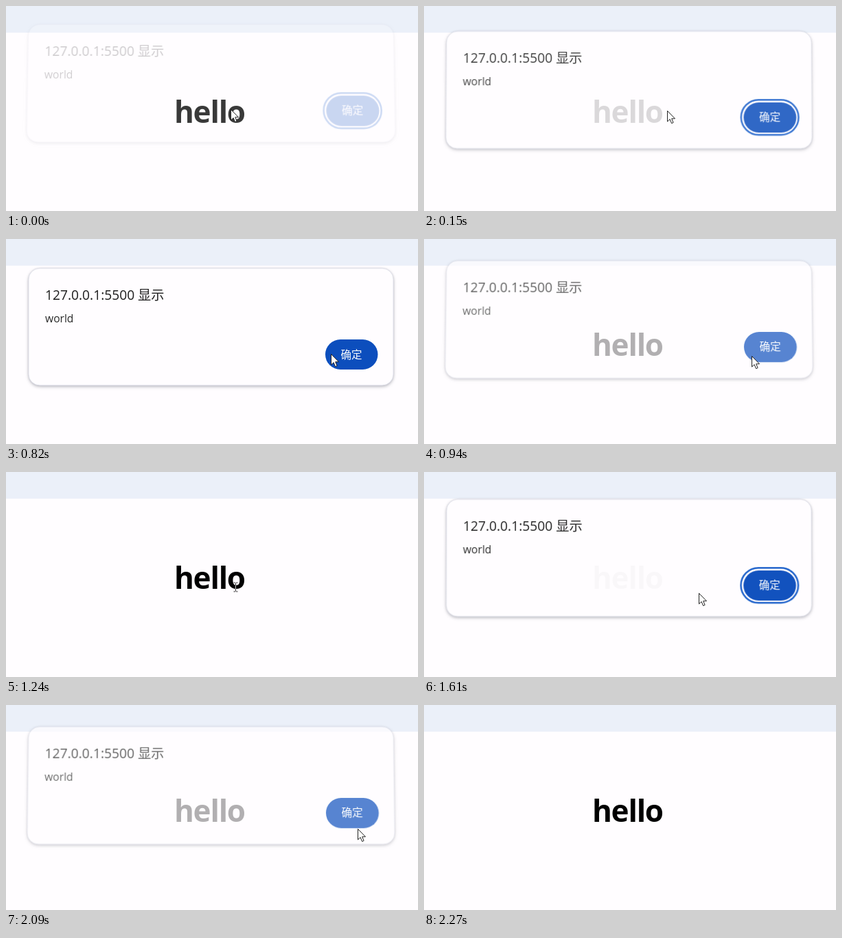
An HTML page for the animation above (2480 ms loop, 600 by 300 pixels).

```html
<!DOCTYPE html>
<html lang="zh-CN">
<head>
<meta charset="utf-8">
<title>Alert loop</title>
<style>
  html, body { margin: 0; width: 100%; height: 100%; overflow: hidden; background: #fffdff; }
  #stage { position: relative; width: 600px; height: 300px; overflow: hidden; background: #fffdff; isolation: isolate; }
  svg { position: absolute; left: 0; top: 0; overflow: visible; }
  text { font-family: "Open Sans", "Noto Sans", "Noto Sans CJK SC", "Noto Sans CJK", sans-serif; }
  #dialog { left: 33px; top: 43px; transform-origin: 50% 0; }
  #panel { filter: drop-shadow(0 0 1px rgba(60, 64, 80, .15)) drop-shadow(0 2px 2px rgba(60, 64, 80, .3)); }
  #beam { mix-blend-mode: difference; }
</style>
</head>
<body>
<div id="stage">
  <svg width="600" height="300">
    <rect width="600" height="39" fill="#ebf0f9"/>
    <text x="244.9" y="171" font-size="44" font-weight="700" letter-spacing="-1.2">hello</text>
  </svg>
  <svg id="dialog" width="531" height="171">
    <rect id="panel" width="531" height="171" rx="16" fill="#fffdff" stroke="#e2e3ec"/>
    <text x="24" y="46" font-size="19.2" fill="#1f1f1f">127.0.0.1:5500 显示</text>
    <text x="24" y="79" font-size="15.6" fill="#2b2b2b">world</text>
    <rect id="ring" x="428.3" y="100.3" width="83.4" height="50.9" rx="25.4" fill="none" stroke="#1a5fca" stroke-width="2.5"/>
    <rect x="432" y="104" width="76.5" height="44" rx="22" fill="#0c4ebd"/>
    <text x="470" y="131.5" font-size="15.5" fill="#fff" text-anchor="middle">确定</text>
  </svg>
  <svg id="arrow" width="14" height="20">
    <path d="M0 0V15.6L3.6 12.2L6.1 18.2L8.6 17.1L6.2 11.3H11Z" fill="#fff" stroke="#222" stroke-linejoin="round"/>
  </svg>
  <svg id="beam" width="8" height="16">
    <path d="M-3 -6.5H-.5M.5 -6.5H3M0 -6V6M-3 6.5H-.5M.5 6.5H3" fill="none" stroke="#ccc"/>
  </svg>
</div>
<script>
const LOOP = 2480, OPEN_LEAD = 35, PRESS_LEAD = 80, CLOSE_TIME = 200;
const alerts = [{ open: 0, close: 880 }, { open: 1390, close: 2030 }];

// Places where the pointer turns or rests
const stops = [
  { t: 0, x: 327, y: 151 },
  { t: 520, x: 459, y: 160 },
  { t: 960, x: 477, y: 171 },
  { t: 1190, x: 264, y: 160 },
  { t: 1240, x: 334, y: 168 },
  { t: 1390, x: 334, y: 168 },
  { t: 1610, x: 400, y: 177 },
  { t: 2090, x: 512, y: 181 },
  { t: 2265, x: 532, y: 305 }
];

const $ = id => document.getElementById(id);
const dialog = $("dialog"), ring = $("ring"), arrow = $("arrow"), beam = $("beam");
const clamp = v => Math.max(0, Math.min(1, v));
const smooth = p => p * p * (3 - 2 * p);
const mix = (a, b, p) => a + (b - a) * p;

function pointer(t) {
  const next = stops.findIndex(s => s.t > t);
  if (next < 0) return stops[stops.length - 1];
  const a = stops[next - 1], b = stops[next];
  const p = smooth((t - a.t) / (b.t - a.t));
  return { x: mix(a.x, b.x, p), y: mix(a.y, b.y, p) };
}

function alertPose(a, t) {
  if (t >= a.close) {
    const left = 1 - clamp((t - a.close) / CLOSE_TIME);
    return { alpha: left, lift: 12.5 * (1 - left ** 6) };
  }
  const age = t - a.open + OPEN_LEAD;
  return {
    alpha: 1 - (1 - clamp(age / 300)) ** 2,
    lift: 19 * (1 - clamp(age / 420)) ** 2
  };
}

// Moves the dialog up while its lower edge tips toward the viewer
function tilt(lift) {
  if (!lift) return "none";
  const k = lift * 4.1e-6;
  return `translateY(${-lift}px) matrix3d(1,0,0,0, 0,${1 - k * 90},0,${-k}, 0,0,1,0, 0,0,0,1)`;
}

function draw(t) {
  const a = alerts.find(a => t >= a.open && t < a.close + CLOSE_TIME);
  dialog.style.display = a ? "block" : "none";
  if (a) {
    const { alpha, lift } = alertPose(a, t);
    dialog.style.opacity = alpha;
    dialog.style.transform = tilt(lift);
    ring.style.display = t < a.close - PRESS_LEAD ? "block" : "none";
  }
  const { x, y } = pointer(t);
  const onText = !a && x > 248 && x < 350 && y < 190;
  arrow.style.display = onText ? "none" : "block";
  beam.style.display = onText ? "block" : "none";
  (onText ? beam : arrow).style.transform = `translate(${Math.round(x) + .5}px, ${Math.round(y) + .5}px)`;
}

const start = performance.now();
function tick() {
  draw((performance.now() - start) % LOOP);
  requestAnimationFrame(tick);
}
draw(0);
requestAnimationFrame(tick);
</script>
</body>
</html>
```
